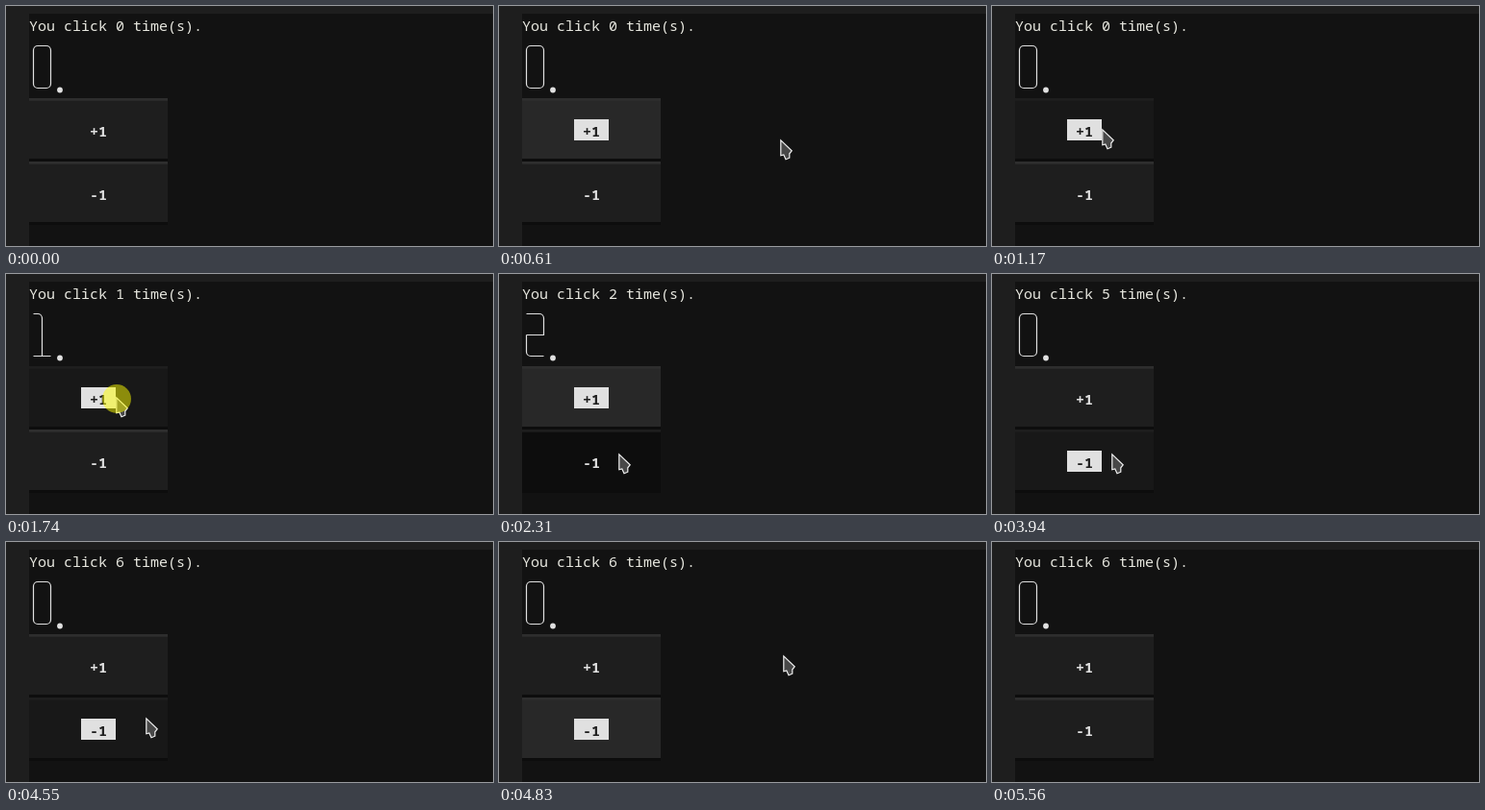
An HTML page with a canvas that plays this animation: 506x250 px, repeating every 5.6 s.

```html
<!DOCTYPE html>
<html lang="en">
<head>
<meta charset="utf-8">
<title>Click counter</title>
<style>
html, body { margin: 0; height: 100%; overflow: hidden; background: #1e1e1e; }
canvas { display: block; }
</style>
</head>
<body>
<canvas id="stage" width="506" height="250"></canvas>
<script>
const ctx = document.getElementById('stage').getContext('2d');
const LOOP = 5600, TICK = 40, ENTER = 210, LEAVE = 5150;
const FG = '#e0e0e0', DARK = '#0d0d0d', SURFACE = '#1e1e1e', LIGHT = '#2e2e2e';
const FONT = '15px "Noto Sans Mono", "DejaVu Sans Mono", monospace';
const arrow = new Path2D('M.8 .8V16.8L3.8 16 6 20.7 9.8 19.2V14.8L12.2 11.8Z');

// The pointer follows a curve from one point to the next, bent towards "via"
const plus = { x: 114, y: 128 }, minus = { x: 124, y: 187 };
const moves = [
  { start: ENTER, end: 1170, from: { x: 418, y: 29 }, via: { x: 268, y: 220 }, to: plus },
  { start: 2070, end: 2310, from: plus, via: { x: 119, y: 158 }, to: minus },
  { start: 4510, end: 5110, from: minus, via: { x: 281, y: 164 }, to: { x: 450, y: -15 } }
];

// Mouse-down times; the rest of each click follows at fixed delays
const UP = 120, COUNT = 160, RELAX = 320;
const clicks = [1210, 1740, 2600, 3140, 3620, 4230]
  .map((down, i) => ({ down, step: i < 2 ? 1 : -1 }));

// Box-drawing digits on a grid of three columns and three rows
const [L, M, R] = [28.5, 37.5, 46.5], [T, C, B] = [41.5, 63.5, 85.5];
const digits = [
  box => box.roundRect(L, T, R - L, B - T, 4.5),
  box => {
    bend(box, L, T, M, T, M, B);
    box.moveTo(L, B);
    box.lineTo(R, B);
  },
  box => {
    bend(box, L, T, R, T, R, C);
    box.lineTo(L, C);
    bend(box, L, C, L, B, R, B);
  }
].map(build => {
  const box = new Path2D();
  build(box);
  return box;
});

function bend(box, x1, y1, x2, y2, x3, y3) {
  box.moveTo(x1, y1);
  box.arcTo(x2, y2, x3, y3, 4.5);
  box.lineTo(x3, y3);
}

function pointer(t) {
  const { start, end, from, via, to } = moves.findLast(m => t >= m.start) || moves[0];
  const held = Math.floor((t - start) / TICK) * TICK;
  const u = Math.min(1, Math.max(0, held / (end - start)));
  const at = axis => Math.round(
    from[axis] * (1 - u) ** 2 + 2 * via[axis] * u * (1 - u) + to[axis] * u * u);
  return [at('x'), at('y')];
}

function rect(color, x, y, w, h) {
  ctx.fillStyle = color;
  ctx.fillRect(x, y, w, h);
}

function disc(color, x, y, r) {
  ctx.fillStyle = color;
  ctx.beginPath();
  ctx.arc(x, y, r, 0, 2 * Math.PI);
  ctx.fill();
}

function text(str, x, y, color, weight) {
  ctx.font = `${weight} ${FONT}`;
  ctx.fillStyle = color;
  ctx.fillText(str, x, y);
}

function button(label, y, { hover, focus, active }) {
  rect(hover ? DARK : SURFACE, 24, y, 144, 66);
  if (focus) rect('rgba(224,224,224,.05)', 24, y, 144, 66);
  rect(active ? DARK : hover ? SURFACE : LIGHT, 24, y, 144, 2.75);
  rect(active ? LIGHT : DARK, 24, y + 63, 144, 3);
  if (focus) rect(FG, 78, y + 22, 36, 22);
  text(label, 87, y + 40, focus ? SURFACE : FG, 800);
  if (active) rect('rgba(18,18,18,.3)', 24, y, 144, 66);
}

function draw(t) {
  const [x, y] = pointer(t);
  const shown = t >= ENTER && t < LEAVE;
  const done = clicks.filter(c => t >= c.down + COUNT);
  const value = done.reduce((v, c) => Math.max(0, v + c.step), 0);
  const pressed = clicks.find(c => t >= c.down + UP && t < c.down + RELAX);
  const focused = t < 490 || t >= 5560 ? 0 : t < 2640 ? 1 : -1;
  const state = (top, step) => ({
    hover: shown && x >= 24 && x < 168 && y >= top && y < top + 66,
    focus: focused === step,
    active: pressed && pressed.step === step
  });

  rect(SURFACE, 0, 0, 506, 250);
  rect('#121212', 24, 8, 482, 242);
  text(`You click ${done.length} time(s).`, 24, 26, '#e8e8e0', 500);

  ctx.strokeStyle = FG;
  ctx.lineWidth = 1.2;
  ctx.stroke(digits[value]);
  disc(FG, 56, 87.5, 2.9);

  button('+1', 96, state(96, 1));
  button('-1', 162, state(162, -1));

  if (!shown) return;
  ctx.save();
  ctx.translate(x, y);
  ctx.fillStyle = '#484848';
  ctx.fill(arrow);
  ctx.strokeStyle = '#f0f0f0';
  ctx.stroke(arrow);
  if (clicks.some(c => t >= c.down && t < c.down + UP)) disc('rgba(255,255,0,.5)', 1, 2, 15);
  ctx.restore();
}

const begin = performance.now();
function frame() {
  draw((performance.now() - begin) % LOOP);
  requestAnimationFrame(frame);
}
frame();
</script>
</body>
</html>
```
